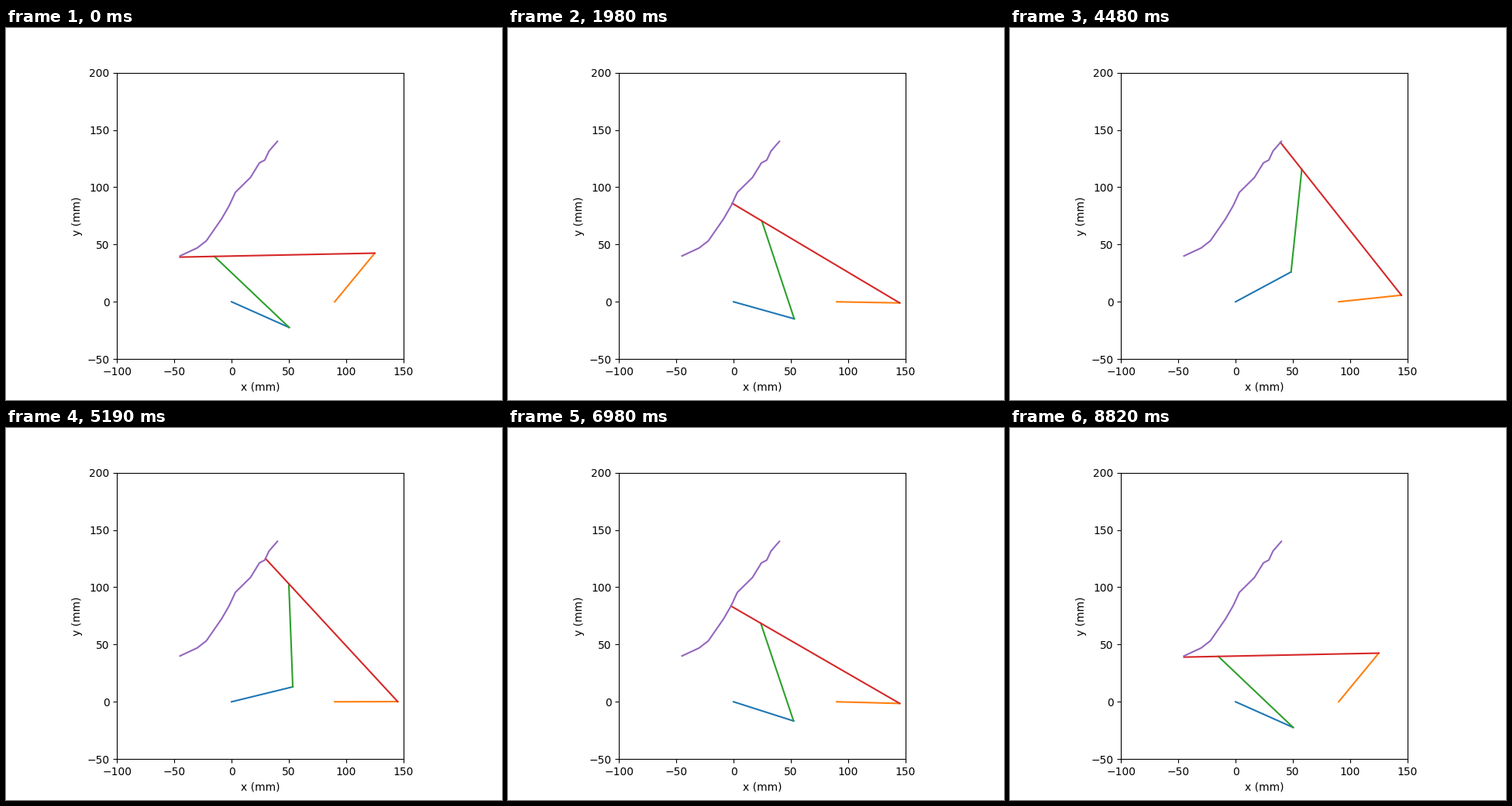
These frames come from a looping animation (640 px wide and 480 px high, 8870 ms). A matplotlib script:

```python
import numpy as np
import matplotlib.pyplot as plt
from matplotlib.animation import FuncAnimation

# Linkage dimensions in mm
CRANK, COUPLER, ARM = 55, 90, 170
JOINT = 140          # distance along the arm where the coupler attaches
LEFT, RIGHT = np.array([0.0, 0.0]), np.array([90.0, 0.0])

# Timing in ms: every leg has 9 poses, the first of which is held longer
TICK, LOOP = 10, 8870
HOLD, STEP, POSES = 50, 20, 9
LEG = HOLD + (POSES - 1) * STEP

# Bends of the climb as leg: (x, y), starting from the home position
BENDS = {
    0: (-45, 39), 1: (-45, 40), 2: (-30, 47), 3: (-22, 53.2), 6: (-8.7, 72.4),
    9: (-2, 84), 11: (3.3, 95.5), 14: (16.5, 108.5), 16: (24.3, 121.2),
    17: (29, 123.7), 19: (32.7, 131.6), 21: (40, 140),
}
LEGS, POINTS = list(BENDS), np.array(list(BENDS.values()))
TOP = LEGS[-1]


def elbow(base, tip, inner, outer):
    """Joint of a two-link chain from base to tip, on the clockwise side."""
    dx, dy = tip - base
    d = np.hypot(dx, dy)
    bend = np.arccos((d * d + inner * inner - outer * outer) / (2 * d * inner))
    angle = np.arctan2(dy, dx) - bend
    return base + inner * np.array([np.cos(angle), np.sin(angle)])


def tip_at(t):
    """Arm tip at time t, moving up the curve and back again."""
    leg, rest = divmod(t, LEG)
    pose = 0 if rest < HOLD else 1 + (rest - HOLD) // STEP
    s = TOP - abs(TOP - leg - pose / POSES)
    return np.array([np.interp(s, LEGS, axis) for axis in POINTS.T])


fig, ax = plt.subplots(figsize=(6.4, 4.8), dpi=100)
ax.set_aspect("equal")
ax.set(xlim=(-100, 150), ylim=(-50, 200), xlabel="x (mm)", ylabel="y (mm)")
ax.set_xticks(range(-100, 151, 50))
ax.set_yticks(range(-50, 201, 50))

links = [ax.plot([], [], color=f"C{i}")[0] for i in range(4)]
ax.plot(*POINTS[1:].T, color="C4")


def update(i):
    tip = tip_at(i * TICK)
    right = elbow(RIGHT, tip, CRANK, ARM)
    joint = right + (tip - right) * JOINT / ARM
    left = elbow(LEFT, joint, CRANK, COUPLER)
    ends = (LEFT, left), (RIGHT, right), (left, joint), (right, tip)
    for link, pair in zip(links, ends):
        link.set_data(*zip(*pair))
    return links


anim = FuncAnimation(fig, update, frames=LOOP // TICK, interval=TICK,
                     repeat=True, repeat_delay=0)
plt.show()
```
